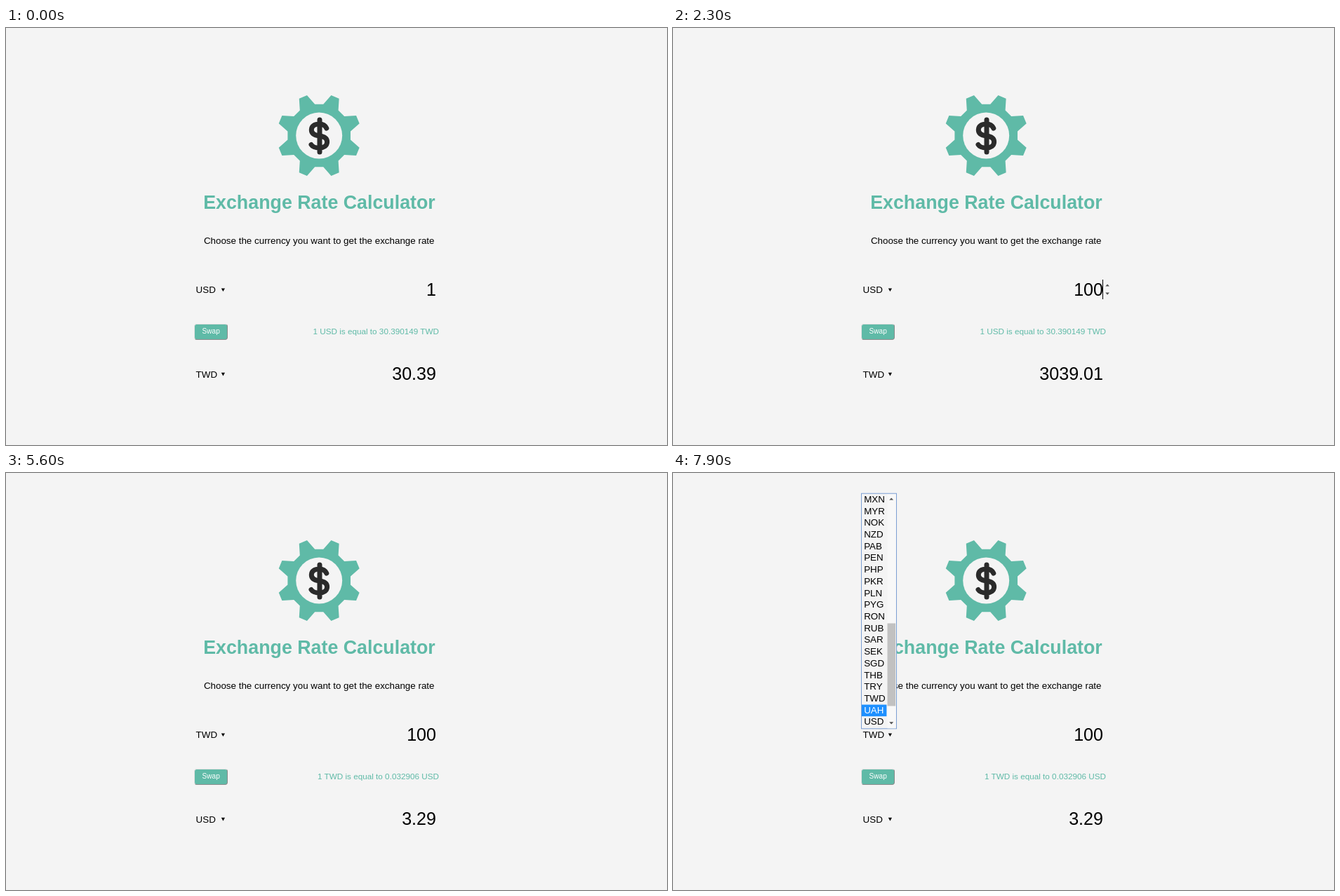
Write an HTML page that moves like this. It is 942 px wide and 595 px high and loops after 8000 ms.

```html
<!DOCTYPE html>
<html lang="en">
<head>
<meta charset="utf-8">
<title>Exchange Rate Calculator</title>
<style>
  html, body { margin: 0; width: 100%; height: 100%; overflow: hidden; background: #f4f4f4; }
  body, text { font-family: "Liberation Sans", Arial, sans-serif; }
  svg { position: absolute; left: 0; top: 0; }
  text { font-size: 13.39px; white-space: pre; }
  .title { font-size: 26.8px; font-weight: bold; fill: #5fbaa7; }
  .amount { font-size: 25.1px; text-anchor: end; }
  .rate { font-size: 11.72px; text-anchor: end; fill: #5fbaa7; }
  .mid { text-anchor: middle; }
  .selection { fill: #3390ff; }
  .spinner { fill: #505050; }
  #swap {
    position: absolute; left: 268.4px; top: 422.4px; width: 47.6px; height: 22.6px;
    box-sizing: border-box; border: 1.7px solid; border-color: #e2e2e2 #8c8c8c #8c8c8c #e2e2e2;
    border-radius: 4px; background: #5fbaa7; color: #fff;
    font-size: 10.05px; line-height: 19.6px; text-align: center;
  }
  #swap.pressed { border-color: #8c8c8c #e2e2e2 #e2e2e2 #8c8c8c; }
</style>
</head>
<body>
<svg width="942" height="595" viewBox="0 0 942 595">
  <path id="gear" fill="#5fbaa7"/>
  <circle cx="446.2" cy="153.5" r="33" fill="#f4f4f4"/>
  <path fill="none" stroke="#2b2b2b" stroke-width="7" stroke-linecap="round"
    d="M447 131V177M456.8 143C455 139 451 137 446.5 137C440 137 435.3 140 435.3 145.2C435.3 151 440 153 446 153.8C453 154.6 457.6 157 457.6 162.5C457.6 168 452.5 171 446.5 171C441 171 437 169.7 435 166.5"/>
  <text class="title mid" x="446.5" y="258.4">Exchange Rate Calculator</text>
  <text class="mid" x="446.2" y="308">Choose the currency you want to get the exchange rate</text>

  <text id="fromCode" x="270.6" y="378.2"/>
  <text id="toCode" x="270.6" y="498.6"/>
  <path d="M306.8 371.4h5.2l-2.6 4.6zM306.8 491.8h5.2l-2.6 4.6z"/>

  <rect id="amountSelection" class="selection" x="599" y="359" width="14" height="28"/>
  <text id="fromAmount" class="amount" x="613" y="381.6"/>
  <text id="toAmount" class="amount" x="613" y="502"/>
  <rect id="caret" y="359" width="1" height="28"/>
  <path id="fromSpinner" class="spinner" d="M616.3 368.6h5.6l-2.8-3.1zM616.3 377.6h5.6l-2.8 3.1z"/>
  <path id="toSpinner" class="spinner" d="M616.3 489h5.6l-2.8-3.1zM616.3 498h5.6l-2.8 3.1z"/>

  <rect id="rateSelection" class="selection" y="426.4" height="13.8"/>
  <text class="rate" x="617" y="437"><tspan id="ratePlain"/><tspan id="rateSelected" fill="#fff"/></text>

  <g id="menu">
    <rect x="268.5" y="29.2" width="50" height="335.6" fill="#f4f4f4" stroke="#7b9fd3"/>
    <rect x="305.5" y="30" width="12" height="334.3" fill="#f8f8f8"/>
    <rect id="thumb" x="305.5" width="11.6" height="118" fill="#c1c1c1"/>
    <path class="spinner" d="M308.2 38.6h6l-3-3.2zM308.2 355.2h6l-3 3.2z"/>
    <rect id="menuHighlight" x="269" width="35.4" height="16.6" fill="#1e90ff"/>
    <g id="menuItems"></g>
  </g>
</svg>
<div id="swap">Swap</div>

<script>
const LOOP = 8000, ROW = 16.72, VISIBLE_ROWS = 20;
const $ = id => document.getElementById(id);
const show = (id, on) => $(id).style.display = on ? '' : 'none';
const put = (id, value) => { if ($(id).textContent !== value) $(id).textContent = value; };
const within = (t, ...spans) => spans.some(([from, to]) => t >= from && t < to);
// Value of the last [time, value] step already reached.
const at = (t, steps) => steps.filter(([time]) => t >= time).pop()[1];

const codes = ('AED ARS AUD BGN BRL BSD CAD CHF CLP CNY COP CZK DKK DOP EGP EUR FJD GBP ' +
  'GTQ HKD HRK HUF IDR ILS INR ISK JPY KRW KZT MXN MYR NOK NZD PAB PEN PHP PKR PLN PYG ' +
  'RON RUB SAR SEK SGD THB TRY TWD UAH USD UYU VND ZAR').split(' ');

function gearPath() {
  const points = [];
  for (let tooth = 0; tooth < 8; tooth++) {
    const axis = 22.5 + tooth * 45;
    for (const [offset, radius] of [[-14.8, 45.2], [-5.8, 60], [5.8, 60], [14.8, 45.2]]) {
      const a = (axis + offset) * Math.PI / 180;
      points.push([446.2 + radius * Math.cos(a), 153.5 + radius * Math.sin(a)]);
    }
  }
  return 'M' + points.join('L') + 'Z';
}
$('gear').setAttribute('d', gearPath());

const rows = Array.from({ length: VISIBLE_ROWS }, (_, i) => {
  const row = document.createElementNS('http://www.w3.org/2000/svg', 'text');
  row.setAttribute('x', 272.2);
  row.setAttribute('y', 41.8 + i * ROW);
  return $('menuItems').appendChild(row);
});

function drawMenu(first, active) {
  rows.forEach((row, i) => {
    row.textContent = codes[first + i];
    row.setAttribute('fill', codes[first + i] === active ? '#fff' : '#000');
  });
  $('menuHighlight').setAttribute('y', 29.6 + (codes.indexOf(active) - first) * ROW);
  $('thumb').setAttribute('y', 45.5 + first / codes.length * 303);
}

function drawRate(text, selectedFrom) {
  put('ratePlain', text.slice(0, selectedFrom));
  put('rateSelected', text.slice(selectedFrom));
  const width = selectedFrom < text.length ? $('rateSelected').getComputedTextLength() : 0;
  $('rateSelection').setAttribute('x', 617 - width);
  $('rateSelection').setAttribute('width', width);
}

function draw(t) {
  const swapped = t >= 3800;
  const amountSelected = within(t, [900, 1500]);

  put('fromCode', swapped ? 'TWD' : 'USD');
  put('toCode', swapped ? 'USD' : 'TWD');
  put('fromAmount', at(t, [[0, '1'], [1500, ''], [1900, '1'], [2100, '10'], [2300, '100']]));
  put('toAmount', at(t, [[0, '30.39'], [1500, '0.00'], [1900, '30.39'], [2100, '303.90'],
    [2300, '3039.01'], [3800, '3.29']]));
  $('fromAmount').setAttribute('fill', amountSelected ? '#fff' : '#000');
  show('amountSelection', amountSelected);

  show('caret', within(t, [600, 900], [1900, 2700], [3200, 3700]));
  $('caret').setAttribute('x', t < 900 ? 599 : 612);
  show('fromSpinner', within(t, [500, 3700], [4700, 4800], [5000, 5300], [5500, 5600]));
  show('toSpinner', within(t, [4200, 4300], [4600, 4700]));
  $('swap').classList.toggle('pressed', within(t, [3700, 3800]));

  const rate = swapped ? '1 TWD is equal to 0.032906 USD' : '1 USD is equal to 30.390149 TWD';
  drawRate(rate, at(t, [[0, rate.length], [6500, 18], [6600, 0], [7000, rate.length]]));

  show('menu', t >= 7700);
  if (t >= 7900) drawMenu(29, 'UAH');
  else drawMenu(32, 'TWD');
}

const start = performance.now();
function tick() {
  draw((performance.now() - start) % LOOP);
  requestAnimationFrame(tick);
}
tick();
</script>
</body>
</html>
```
